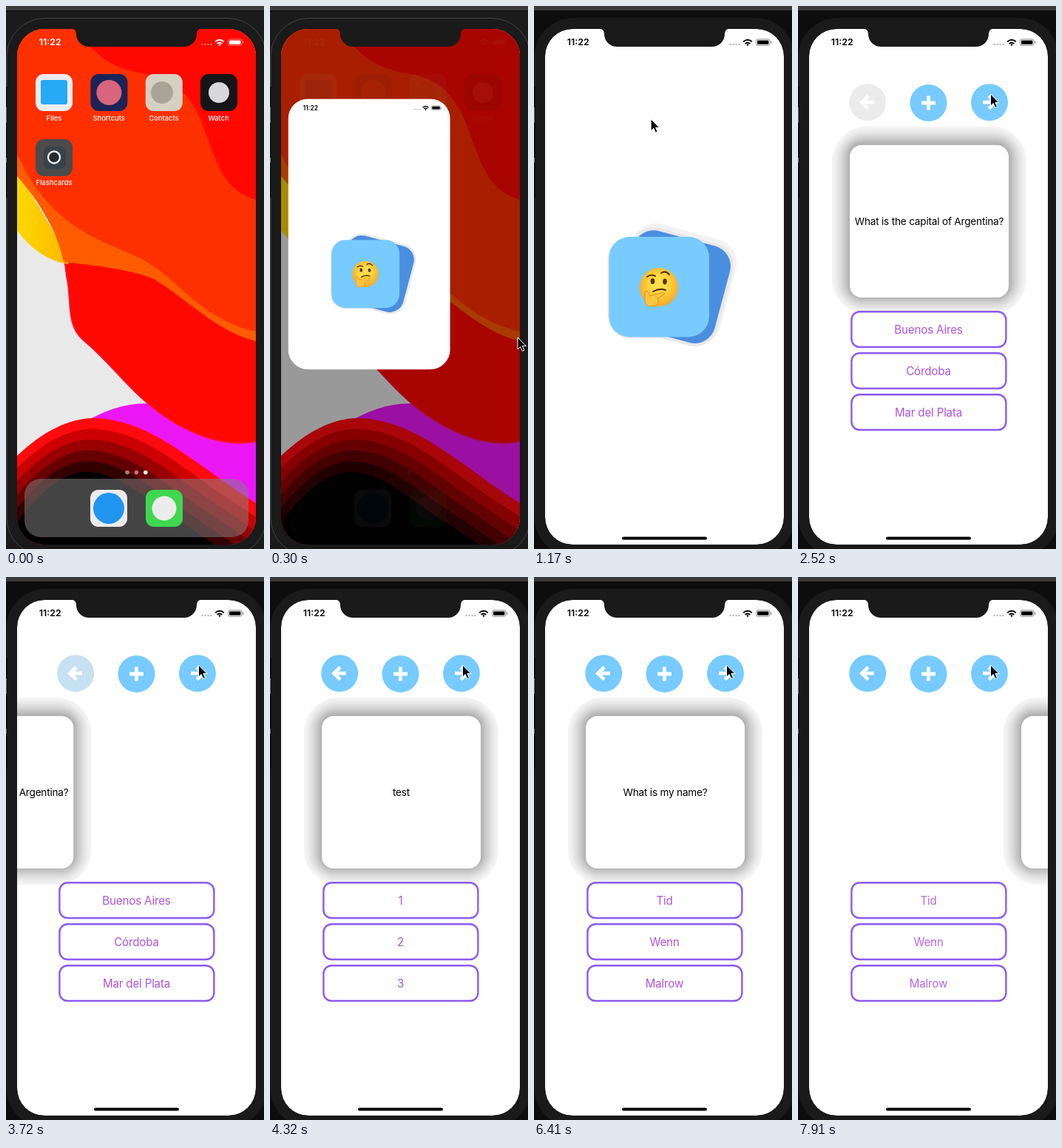
Recreate the animation shown at these times as an HTML page. Size 349 by 734 pixels, loop 8 s.

```html
<!DOCTYPE html>
<html lang="en">
<head>
<meta charset="utf-8">
<title>Flashcards</title>
<style>
  html, body { margin: 0; width: 100%; height: 100%; overflow: hidden; background: #1b1b1b; }
  svg { display: block; width: 349px; height: 734px; }
  text { font-family: Inter, Roboto, sans-serif; text-anchor: middle; }
  .time { font-size: 12.4px; font-weight: 600; }
  .label { font-size: 9.4px; font-weight: 500; fill: #fff; }
  .question { font-size: 13.6px; letter-spacing: -.2px; }
  .answer { font-size: 15.2px; letter-spacing: -.2px; fill: #af52de; }
  .sign { fill: none; stroke: #fff; stroke-width: 4.8; }
</style>
</head>
<body>
<svg id="stage" viewBox="0 0 349 734"></svg>
<script>
const LOOP = 8000;
const SKY = '#77cbff';
const cards = [
  ['What is the capital of Argentina?', 'Buenos Aires', 'Córdoba', 'Mar del Plata'],
  ['test', '1', '2', '3'],
  ['What is my name?', 'Tid', 'Wenn', 'Malrow']
];
// start and length of each card change
const turns = [[3570, 750], [5810, 600], [7610, 600]];

const rect = (x, y, w, h, r, fill, more = '') =>
  `<rect x="${x}" y="${y}" width="${w}" height="${h}" rx="${r}" fill="${fill}" ${more}/>`;
const circle = (x, y, r, fill, more = '') =>
  `<circle cx="${x}" cy="${y}" r="${r}" fill="${fill}" ${more}/>`;
const path = (d, fill, more = '') => `<path d="${d}" fill="${fill}" ${more}/>`;
const text = (cls, x, y, s, more = '') =>
  `<text class="${cls}" x="${x}" y="${y}" ${more}>${s}</text>`;
const times = (n, draw) => Array.from({ length: n }, (_, i) => draw(i)).join('');

function statusBar(ink, dot) {
  return text('time', 59.7, 53.3, '11:22', `fill="${ink}"`) +
    times(4, i => circle(265.5 + i * 4, 52, 1.2, dot)) +
    `<g fill="none" stroke="${ink}" stroke-width="1.9">
      <path d="M283.2 48.3q5.8-5 11.6 0M285.6 50.9q3.4-2.8 6.8 0"/></g>` +
    circle(289, 52.5, 1.3, ink) +
    rect(300.5, 44.9, 18.4, 8.4, 2.4, 'none', `stroke="${ink}" stroke-opacity=".45"`) +
    rect(302, 46.4, 15.4, 5.4, 1.2, ink) +
    rect(320, 47.4, 1.2, 3.4, .6, ink, 'opacity=".5"');
}

function wallpaper() {
  const hump = 'M-60 700C0 610 60 557 120 557C200 560 255 620 338 672L420 728H-60Z';
  return rect(15, 31, 323, 697, 0, '#e9e9ea') +
    path('M100 566C140 542 175 532 215 540L338 580V690H100Z', '#ec17f7') +
    path('M15 31H340V588C300 597 255 582 215 555C165 520 145 485 105 452C80 430 90 400 82 365Q79 335 70 310L15 215Z',
      '#ff0800', 'stroke="#f8142c" stroke-width="2"') +
    path('M15 225C40 265 65 300 85 349C55 345 30 325 15 303Z', 'url(#gold)') +
    path('M15 150V230C45 265 68 300 78 346C120 351 165 355 200 369C245 396 285 440 338 453V100Z', '#ff5c00') +
    path('M15 31V200C40 255 70 285 110 308C160 335 185 335 225 372C265 410 300 432 338 440V31Z', '#ff3000') +
    path('M95 31C125 75 150 85 190 92C250 103 262 150 275 185C290 225 300 250 338 262V31Z', '#ff0800') +
    times(6, i => path(hump, `rgb(${255 * (1 - i / 5)},${i ? 0 : 10},${i ? 0 : 14})`,
      `transform="translate(95 728) scale(${1 - i * .085}) translate(-95 -728)"`));
}

function homeIcons() {
  const tile = (x, y, fill) => rect(x, y, 50, 50, 11, fill);
  const label = (x, y, s) => text('label', x, y, s);
  return tile(40, 92, '#ececee') + rect(47, 100, 36, 33, 3, '#27a9f5') + label(65, 154.5, 'Files') +
    tile(114.4, 92, '#1b2456') + circle(139.4, 117, 17, '#d9657c') + label(139.2, 154.5, 'Shortcuts') +
    tile(188.8, 92, '#d6d0c3') + circle(211, 117, 15, '#a9a398') + label(213.4, 154.5, 'Contacts') +
    tile(263, 92, '#151517') + circle(288, 117, 14, '#d8d8da') + label(287.6, 154.5, 'Watch') +
    label(65, 241.8, 'Flashcards') +
    times(3, i => circle(164 + i * 12.4, 630.5, 2.8, '#fff', `opacity="${i < 2 ? .5 : 1}"`)) +
    rect(25, 639, 303, 79, 22, 'rgba(128,128,128,.53)') +
    tile(114, 654, '#ececee') + circle(139, 679, 21, '#1f95f0') +
    tile(189, 654, '#3fd74f') + circle(214, 679, 16.5, '#ececec');
}

const launchTile = rect(40, 180, 50, 50, 11, '#494b4d') +
  rect(51, 190, 30, 30, 8, '#394149') +
  circle(65, 204.5, 8, '#24292d', 'stroke="#eef1f2" stroke-width="2.4"');

function thinker() {
  return circle(169, 380, 26, 'url(#face)') +
    `<g fill="#5b3210"><ellipse cx="160.5" cy="372" rx="2.8" ry="4"/><ellipse cx="177" cy="372.5" rx="2.8" ry="4"/></g>
    <g fill="none" stroke="#5b3210" stroke-width="2" stroke-linecap="round">
      <path d="M153 366q5-4 11-1M172 361q6-4 11 2M161 386q9-5 17-2"/></g>` +
    path('M150 386q3-3 5 2l2 4 17-5q5 1 1 4l-8 4q4 8-5 11q-11 2-12-8Z', '#ffc53d',
      'stroke="#e08f1c" stroke-width="1"');
}

function splash() {
  const back = (x, y, fill, more = '') => rect(x - 67.5, y - 67.5, 135, 135, 28, fill,
    `transform="rotate(15 ${x} ${y})" ${more}`);
  return `<g id="glow">${back(192.6, 375.4, '#f2f2f2', 'stroke="#f2f2f2" stroke-width="10"')}</g>` +
    back(189.6, 379.6, '#e8e8e8', 'stroke="#e8e8e8" stroke-width="8"') +
    rect(100, 313, 137, 136, 29, '#e4e4e4') +
    back(189.6, 379.6, '#4a8ee0') +
    rect(101.5, 312, 135.5, 135.5, 28, SKY) + thinker();
}

function quiz() {
  const rings = 10;
  const shadow = times(rings, i => {
    const d = 24 - i * 2.4, shade = Math.round(243 - 64 * (i / (rings - 1)) ** 1.4);
    return rect(70 - d, 188.5 - d - 1.5, 215 + 2 * d, 205 + 2 * d, 16 + d * 1.3, `rgb(${shade},${shade},${shade})`);
  });
  const arrow = 'M86 130.2H103M95 121.8L86.6 130.2L95 138.6';
  return `<g id="card">${shadow}${rect(70, 188, 215, 206, 16, '#fff')}${text('question', 177.5, 296, '', 'id="question"')}</g>` +
    circle(94.2, 130.2, 25, SKY, 'id="prev"') + path(arrow, 'none', 'class="sign"') +
    circle(176.5, 131, 25, SKY) + path('M167 131H186M176.5 121.5V140.5', 'none', 'class="sign"') +
    circle(259, 130.2, 25, SKY) + path(arrow, 'none', 'class="sign" transform="translate(353.2 0) scale(-1 1)"') +
    times(3, i => rect(72.4, 413.2 + i * 56, 209, 47.8, 11, '#fff', 'stroke="#8c5af2" stroke-width="2.4"') +
      text('answer', 176.5, 443 + i * 56, ''));
}

document.getElementById('stage').innerHTML = `
  <defs>
    <clipPath id="screen">${rect(15, 31, 323, 697, 37, '#000')}</clipPath>
    <clipPath id="frame">${rect(15, 31, 323, 697, 37, '#000', 'id="hole"')}</clipPath>
    <linearGradient id="gold"><stop stop-color="#fbd800"/><stop offset="1" stop-color="#ffb800"/></linearGradient>
    <radialGradient id="face" cy=".42" r=".6"><stop offset=".3" stop-color="#ffdf48"/>
      <stop offset="1" stop-color="#f5a524"/></radialGradient>
  </defs>
  ${rect(0, 0, 349, 734, 0, '#1b1b1b', 'id="desk"')}
  ${rect(0, 0, 349, 6, 0, '#3a3a3b')}${rect(0, 6, 349, 1.2, 0, '#0a0a0a')}
  ${rect(1, 16.5, 351, 727, 52, '#1a1a1a', 'id="body"')}
  ${rect(0, 109, 1.5, 150, 0, '#050505')}${rect(0, 137, 1, 21, 0, '#6a6a6a')}${rect(0, 205, 1, 7, 0, '#6a6a6a')}
  <g clip-path="url(#screen)">
    <g id="home">${wallpaper()}<g id="icons">${homeIcons()}${statusBar('#fff', '#ff7a66')}</g>
      <g id="tile">${launchTile}</g>
      ${rect(15, 31, 323, 697, 0, '#000', 'id="dim"')}</g>
    <g id="app" clip-path="url(#frame)"><g id="view">
      ${rect(15, 31, 323, 697, 0, '#fff')}
      <g id="splash">${splash()}</g><g id="quiz">${quiz()}</g>
      ${statusBar('#000', '#b5b5b5')}
    </g></g>
    ${rect(119, 717.6, 115, 4, 2, '#000', 'id="bar"')}
    ${path('M88 30.5Q95 31 95 38A17 17 0 0 0 112 55H241A17 17 0 0 0 258 38Q258 31 265 30.5Z', '#1a1a1a')}
  </g>
  ${path('M0 0V16L3.7 12.6L6.3 18.4L9 17.2L6.4 11.6H11.4Z', '#000', 'id="cursor" stroke="#fff" stroke-width="1" stroke-linejoin="round"')}`;

const $ = id => document.getElementById(id);
const answers = [...document.querySelectorAll('.answer')];
const set = (id, attrs) => { for (const k in attrs) $(id).setAttribute(k, attrs[k]); };
const mix = (a, b, k) => a + (b - a) * k;
const show = (id, on) => set(id, { opacity: +on });

// value at time t on a list of [time, value] points
function track(points, t, col = 1) {
  const i = points.findIndex(p => p[0] > t);
  if (i < 0) return points[points.length - 1][col];
  if (!i) return points[0][col];
  const a = points[i - 1], b = points[i];
  return mix(a[col], b[col], (t - a[0]) / (b[0] - a[0]));
}

const opening = [[110, 0], [150, .12], [295, .62], [440, .94], [585, .985], [730, 1]];
const pointer = [
  [150, 352, 470], [295, 335, 448], [440, 305.5, 421.5], [730, 225, 280], [1020, 166, 160], [1165, 163, 149.5],
  [1320, 12, 250], [1470, 120, 440], [1620, 288, 401], [1900, 288, 401], [1925, 296, 330],
  [2070, 280, 170], [2220, 232, 60], [2370, 205, 88], [2500, 260.5, 119]
];
const slide = [[-50, 0], [0, -28], [150, -245], [225, -330], [226, 335], [292, 232], [450, 52], [585, 0]];
const fade = [[150, 1], [300, .88], [375, .1], [450, .8], [600, 1]];

function snap(t) {
  const [start, step] = t < 1165 ? [150, 145] : [1170, 149.6];
  return t < 150 ? 0 : start + Math.max(0, Math.floor((t - start) / step)) * step;
}

function drawLaunch(t) {
  const p = track(opening, t);
  const x = mix(40, 15, p), y = mix(180, 31, p ** 2.1);
  const width = mix(50, 323, p), height = mix(50, 697, p ** 1.5);
  set('hole', { x, y, width, height, rx: mix(11, 37, p) });
  set('view', { transform: `translate(${x} ${y}) scale(${width / 323}) translate(-15 -31)` });
  show('app', Math.min(1, p * 2));
  show('home', p < 1);
  show('icons', Math.max(0, 1 - p * 1.5));
  show('tile', p < .1);
  set('dim', { opacity: Math.min(.48, p * .55) });
  show('glow', p === 1);
  show('bar', t > 860);
  const settled = t >= 1165;
  set('desk', { fill: settled ? '#0d0d0d' : '#1b1b1b' });
  set('body', { stroke: settled ? '#1a1a1a' : '#424242' });
}

function drawQuiz(t) {
  let done = 0, x = 0, alpha = 1;
  for (const [start, length] of turns) {
    const rel = (t - start) * 600 / length;
    if (rel < -50) break;
    x = track(slide, rel);
    alpha = track(fade, rel);
    done += rel > 375;
  }
  const [question, ...list] = cards[done % 3];
  set('card', { transform: `translate(${x} 0)` });
  $('question').textContent = question;
  answers.forEach((el, i) => {
    el.textContent = list[i];
    el.setAttribute('opacity', alpha);
  });
  const k = track([[3570, 0], [4020, 1]], t);
  set('prev', { fill: `rgb(${mix(235, 119, k)},${mix(235, 203, k)},${mix(235, 255, k)})` });
}

function render(now) {
  const t = snap(now % LOOP), ready = t >= 1319;
  drawLaunch(t);
  show('splash', !ready);
  show('quiz', ready);
  drawQuiz(t);
  set('cursor', { transform: `translate(${track(pointer, t)} ${track(pointer, t, 2)})` });
}

const begin = performance.now();
function tick() {
  render(performance.now() - begin);
  requestAnimationFrame(tick);
}
tick();
</script>
</body>
</html>
```
